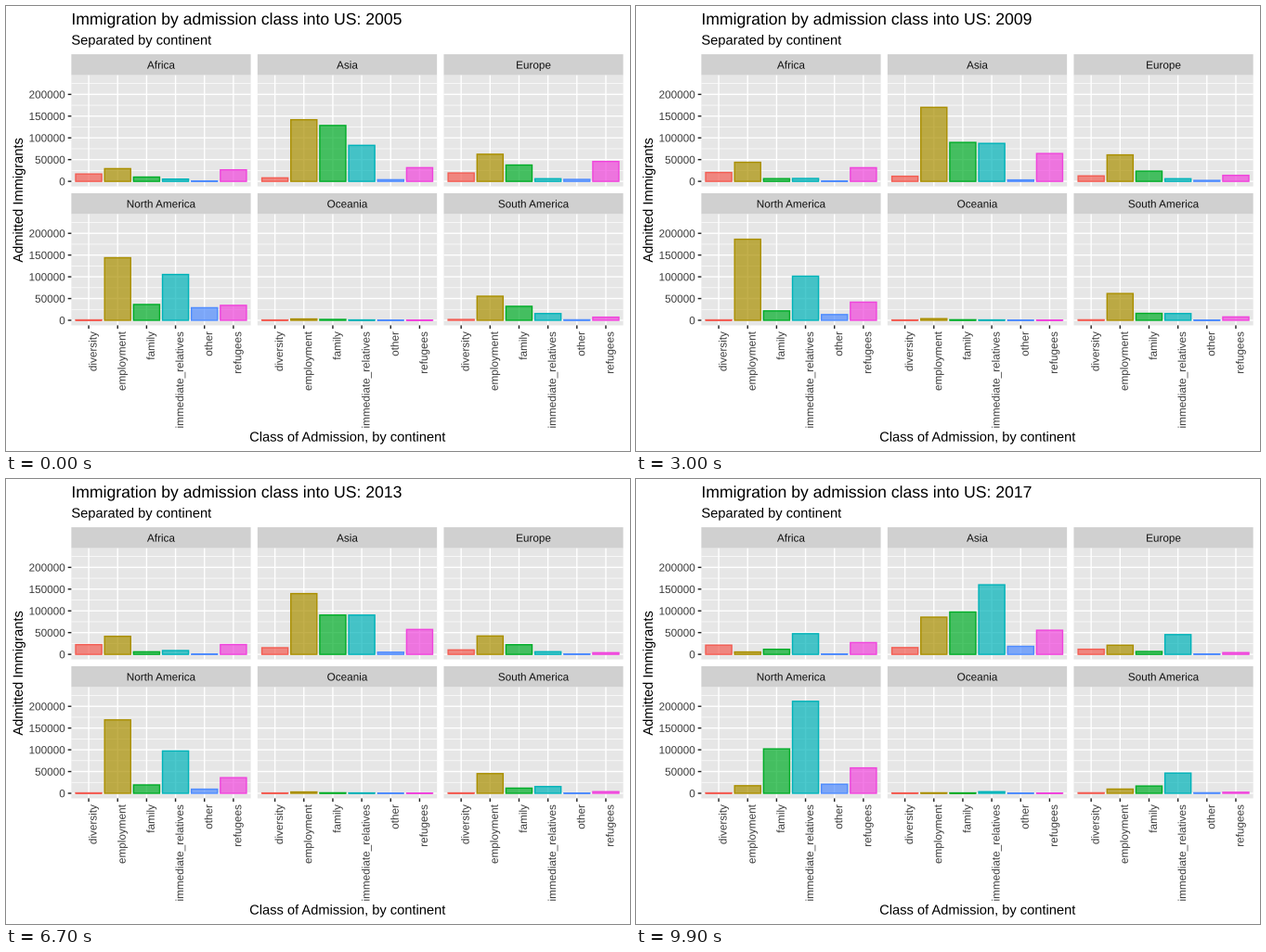
Recreate the animation shown at these times as a matplotlib script. Size 672 by 480 pixels, loop 10000 ms.

```python
import numpy as np
import matplotlib.pyplot as plt
from matplotlib import patheffects
from matplotlib.animation import FuncAnimation
from matplotlib.colors import to_rgba
from matplotlib.patches import Rectangle

plt.rcParams.update({"font.family": "Liberation Sans", "text.hinting": "no_hinting"})

W, H, DPI = 672, 480, 96
FRAMES, STEP = 100, 100
YEARS = np.arange(2005, 2018)

# Layout in pixels, y downwards
PT = DPI / 72
CAP = 0.718                         # cap height of the font
GAP, TICK = 5.5 * PT, 2.75 * PT
LEFT, RIGHT, TOP, BOTTOM = 70.37, W - GAP, 52.05, 344.45
STRIP_H = 22.65
PANEL_W = (RIGHT - LEFT - 2 * GAP) / 3
PANEL_H = (BOTTOM - TOP - GAP) / 2 - STRIP_H
UNIT = PANEL_W / 6.2
PEAK = 232.4                        # top of the scale, in thousands
SCALE = PANEL_H / 1.1 / PEAK
LINE = 1.067

# Each class: colour and turning points (year: national total in thousands)
CLASSES = {
    "diversity": ("#f35d53", {2005: 47}),
    "employment": ("#aa8f00", {2005: 436, 2006: 580, 2007: 495, 2009: 536, 2010: 476,
                               2013: 440, 2015: 465, 2016: 567, 2017: 516}),
    "family": ("#00ad28", {2005: 247, 2006: 160, 2017: 138}),
    "immediate_relatives": ("#00b3b9", {2005: 215, 2016: 215, 2017: 232}),
    "other": ("#4f8cff", {2005: 37, 2006: 43, 2007: 22, 2013: 15, 2014: 31, 2017: 40}),
    "refugees": ("#f044dc", {2005: 143, 2006: 216, 2007: 136, 2009: 177, 2010: 136,
                             2011: 168, 2013: 120, 2016: 157, 2017: 146}),
}

# Share of each class per continent: constant, or evenly spaced over the years
SHARES = {
    "Africa": ((.36, .49, .45), (.067, .095, .092), .04, (.024, .036, .05), .02, .185),
    "Asia": ((.17, .32, .33), (.325, .32, .31), (.52, .62, .62), (.385, .42, .42),
             (.1, .22, .46), (.22, .53, .38)),
    "Europe": ((.41, .2, .25), (.143, .1, .088), .152, .028, (.12, .1, .02),
               (.32, .033, .027)),
    "North America": (.02, (.33, .368, .41), (.147, .135, .126), (.49, .46, .44),
                      (.78, .58, .52), (.24, .25, .4)),
    "Oceania": (.017, .007, .008, .004, .003, .002),
    "South America": ((.04, .017, .025), (.127, .11, .09), (.13, .088, .07), .072, .03,
                      (.05, .043, .016)),
}


def drift(share):
    """Share per year, changing at a steady rate between its points."""
    pts = np.log(np.atleast_1d(share))
    return np.exp(np.interp(YEARS, np.linspace(YEARS[0], YEARS[-1], len(pts)), pts))


def series(name):
    """Values of a continent's bars, one row per class, one column per frame."""
    vals = np.array([drift(s) * np.interp(YEARS, list(t), list(t.values()))
                     for s, (_, t) in zip(SHARES[name], CLASSES.values())])
    # the three main classes trade places in the last year
    vals[1:4, -1] = np.roll(vals[1:4, -1], -1)
    t = np.linspace(YEARS[0], YEARS[-1], FRAMES)
    return [np.interp(t, YEARS, row) for row in vals]


fig = plt.figure(figsize=(W / DPI, H / DPI), dpi=DPI, facecolor="white")
ax = fig.add_axes([0, 0, 1, 1])
ax.set(xlim=(0, W), ylim=(H, 0))
ax.axis("off")


def box(x, y, w, h, color):
    ax.add_patch(Rectangle((x, y), w, h, fc=color, lw=0, snap=False))


def line(x0, y0, x1, y1, color="white", lw=LINE):
    ax.plot([x0, x1], [y0, y1], color=color, lw=lw, snap=False,
            solid_capstyle="butt")


def label(x, y, s, size=8.8, color="black", ha="left", rot=0):
    # the path effect draws glyphs at fractional pixel positions
    return ax.text(x, y, s, fontsize=size, color=color, ha=ha, va="baseline",
                   rotation=rot, rotation_mode="anchor",
                   path_effects=[patheffects.Normal()])


def panel(i, name):
    row, col = divmod(i, 3)
    x = LEFT + col * (PANEL_W + GAP)
    y = TOP + row * (STRIP_H + PANEL_H + GAP)
    top, bottom = y + STRIP_H, y + STRIP_H + PANEL_H
    base = bottom - PANEL_H * 0.05 / 1.1
    cap = CAP * 8.8 * PT
    box(x, y, PANEL_W, STRIP_H, "#d0d0d0")
    box(x, top, PANEL_W, PANEL_H, "#e6e6e6")
    label(x + PANEL_W / 2, y + (STRIP_H + cap) / 2, name, color="#111111", ha="center")

    for v in range(25, 250, 50):
        line(x, base - v * SCALE, x + PANEL_W, base - v * SCALE, lw=LINE / 2)
    for v in range(0, 250, 50):
        gy = base - v * SCALE
        line(x, gy, x + PANEL_W, gy)
        if col == 0:
            line(x - TICK, gy, x, gy, "#262626")
            label(x - 1.8 * TICK, gy + cap / 2, str(v * 1000), color="#3c3c3c",
                  ha="right")

    bars = []
    for k, ((cls, (color, _)), vals) in enumerate(zip(CLASSES.items(), series(name))):
        cx = x + (k + 0.6) * UNIT
        line(cx, top, cx, bottom)
        if row == 1:
            line(cx, bottom, cx, bottom + TICK, "#262626")
            label(cx + cap, bottom + 1.8 * TICK, cls, color="#3c3c3c", ha="right",
                  rot=90)
        bar = Rectangle((cx - 0.45 * UNIT, base), 0.9 * UNIT, 0, lw=LINE,
                        fc=to_rgba(color, 0.7), ec=color, joinstyle="miter",
                        snap=False, zorder=3)
        ax.add_patch(bar)
        bars.append((bar, -SCALE * vals))
    return bars


bars = [b for i, name in enumerate(SHARES) for b in panel(i, name)]
title = label(LEFT, 19.97, "", 13.2)
label(LEFT, 41.6, "Separated by continent", 11)
label((LEFT + RIGHT) / 2, 469.6, "Class of Admission, by continent", 11, ha="center")
label(17.87, (TOP + STRIP_H + BOTTOM) / 2, "Admitted Immigrants", 11, ha="center",
      rot=90)


def draw(i):
    year = round(YEARS[0] + (YEARS[-1] - YEARS[0]) * i / (FRAMES - 1))
    title.set_text(f"Immigration by admission class into US: {year}")
    for bar, heights in bars:
        bar.set_height(heights[i])
    return [title] + [bar for bar, _ in bars]


anim = FuncAnimation(fig, draw, frames=FRAMES, interval=STEP,
                     repeat=True, repeat_delay=0)
plt.show()
```
